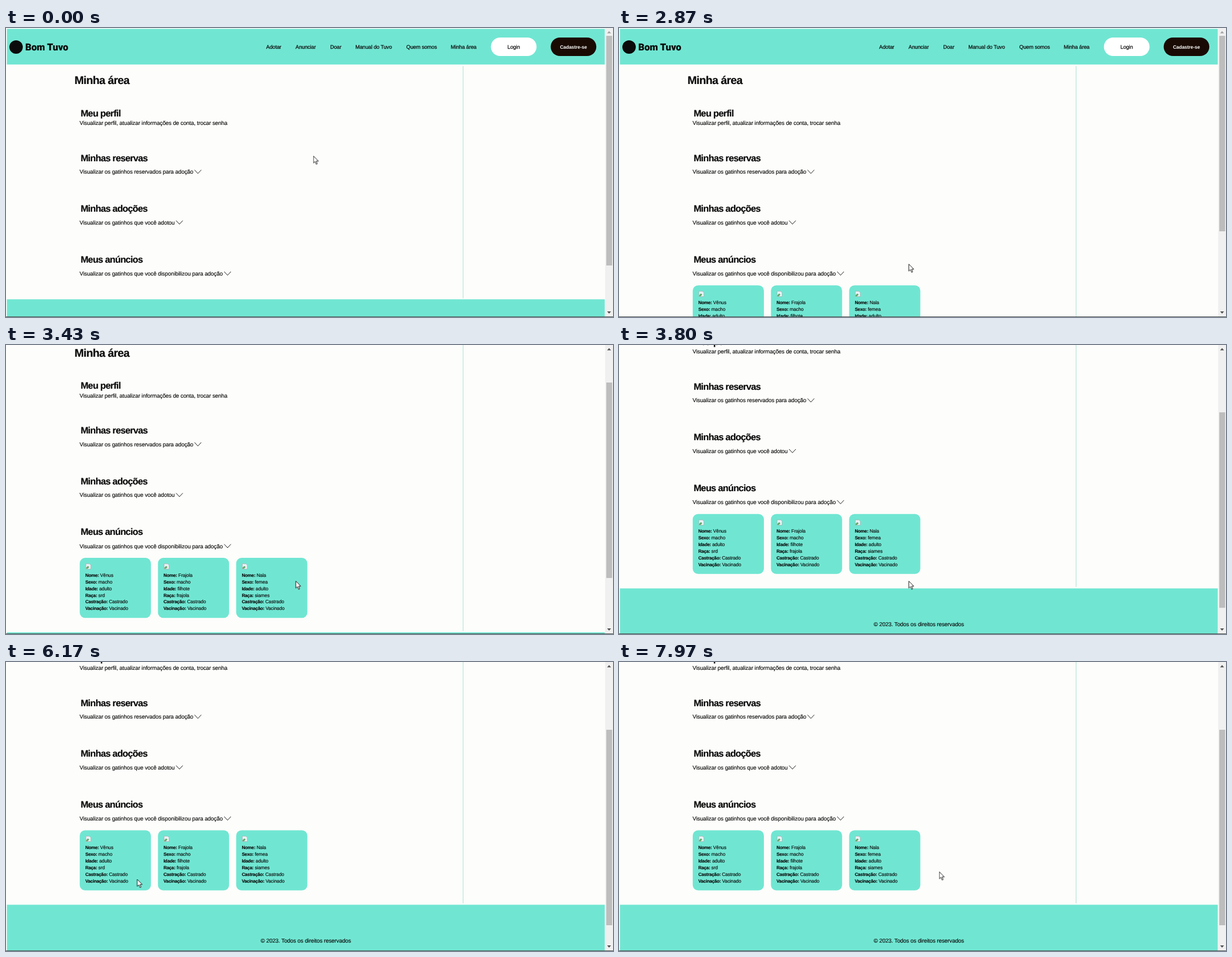
An HTML page that plays this animation: 1085 px wide and 516 px high, repeating every 8000 ms.

```html
<!DOCTYPE html>
<html lang="pt-BR">
<head>
<meta charset="utf-8">
<title>Minha área</title>
<style>
  html, body { margin: 0; width: 100%; height: 100%; overflow: hidden; background: #fdfdfb; }
  svg { display: block; width: 1085px; height: 516px; }
  text {
    font-family: "Liberation Sans", Arial, sans-serif; font-size: 10px; letter-spacing: -.1px;
    fill: #0b0b0b; stroke: #0b0b0b; stroke-width: .15px; white-space: pre;
    text-rendering: geometricPrecision;
  }
  .nav text { font-size: 9.4px; stroke-width: .25px; }
  .nav .join { font-size: 8.6px; font-weight: 700; fill: #fff; stroke: none; }
  .brand { font: 900 17px Roboto, sans-serif; letter-spacing: 0; }
  .title { font-size: 20px; font-weight: 700; letter-spacing: -.65px; stroke-width: .2px; }
  .head { font-size: 16.6px; font-weight: 700; letter-spacing: -.7px; stroke-width: .2px; }
  .card text { font-size: 8.5px; }
  .card .label { font-size: 8.2px; font-weight: 700; letter-spacing: -.25px; }
  .teal { fill: #70e6d2; }
  .chevron { fill: none; stroke: #1a1a1a; stroke-width: 1; }

  .page, .thumb, .footer, .open, .closed, .atTop, .cursor, .arrow, .hand {
    animation: 8s linear infinite;
  }
  .page { animation-name: scroll; }
  .thumb { animation-name: thumb; }
  .footer { animation-name: push; animation-timing-function: step-end; }
  .open { animation-name: show; animation-timing-function: step-end; }
  .closed { animation-name: hide; animation-timing-function: step-end; }
  .atTop { animation-name: enable; animation-timing-function: step-end; }
  .cursor { animation-name: move; animation-timing-function: ease-in-out; }
  .arrow { animation-name: arrow; animation-timing-function: step-end; }
  .hand { animation-name: hand; animation-timing-function: step-end; }

  @keyframes scroll {
    0%, 38.5% { transform: translateY(0); animation-timing-function: ease-in-out; }
    41%, 45% { transform: translateY(-79.4px); animation-timing-function: ease-in-out; }
    47.75%, 100% { transform: translateY(-159px); }
  }
  @keyframes thumb {
    0%, 38.5% { transform: translateY(0); animation-timing-function: ease-in-out; }
    41%, 45% { transform: translateY(53px); animation-timing-function: ease-in-out; }
    47.75%, 100% { transform: translateY(107px); }
  }
  @keyframes push { 0% { transform: translateY(0); } 22%, 100% { transform: translateY(108px); } }
  @keyframes show { 0% { visibility: hidden; } 22%, 100% { visibility: visible; } }
  @keyframes hide { 0% { visibility: visible; } 22%, 100% { visibility: hidden; } }
  @keyframes enable { 0% { fill: #a2a2a2; } 38.5%, 100% { fill: #505050; } }
  @keyframes move {
    0%, 4% { transform: translate(549.5px, 228.5px); }
    16%, 23% { transform: translate(399.5px, 434.5px); }
    30%, 55% { transform: translate(518px, 421.5px); }
    74%, 79% { transform: translate(234.5px, 388px); }
    97%, 100% { transform: translate(572.5px, 374.5px); }
  }
  @keyframes arrow { 0% { visibility: visible; } 15.5% { visibility: hidden; } 23.6%, 100% { visibility: visible; } }
  @keyframes hand { 0% { visibility: hidden; } 15.5% { visibility: visible; } 23.6%, 100% { visibility: hidden; } }
</style>
</head>
<body>
<svg viewBox="0 0 1085 516">
  <rect width="1085" height="516" fill="#fdfdfb"/>

  <g class="page">
    <rect class="teal" x="1.6" y="1.5" width="1068.7" height="63.7"/>
    <circle cx="18" cy="34" r="12" fill="#0b0b0b"/>
    <text class="brand" x="34.5" y="40">Bom Tuvo</text>
    <g class="nav">
      <rect x="866.7" y="17" width="81.7" height="33" rx="16.5" fill="#fff"/>
      <rect x="973.6" y="17" width="81.6" height="33" rx="16.5" fill="#190b03"/>
      <text x="465" y="36.8">Adotar</text>
      <text x="517.5" y="36.8">Anunciar</text>
      <text x="579.5" y="36.8">Doar</text>
      <text x="624.5" y="36.8">Manual do Tuvo</text>
      <text x="715.5" y="36.8">Quem somos</text>
      <text x="795" y="36.8">Minha área</text>
      <text x="907.5" y="36.8" text-anchor="middle">Login</text>
      <text class="join" x="1014.3" y="36.8" text-anchor="middle">Cadastre-se</text>
    </g>

    <rect x="816.3" y="68" width="1.6" height="522" fill="#c6eae2"/>
    <text class="title" x="122.5" y="100.3">Minha área</text>
    <g id="sections"></g>
    <g id="cards" class="open"></g>

    <g class="footer">
      <rect y="482.5" width="1071" height="3" fill="#fdfdfb"/>
      <rect class="teal" x="1.6" y="484.4" width="1068.7" height="240"/>
      <text x="536" y="551.8" text-anchor="middle">© 2023. Todos os direitos reservados</text>
    </g>
  </g>

  <rect x="1071" width="14" height="516" fill="#f0f0f0"/>
  <g class="thumb" fill="#bdbdbd">
    <rect class="closed" x="1073" y="14" width="10.5" height="410"/>
    <rect class="open" x="1073" y="14" width="10.5" height="349"/>
  </g>
  <path class="atTop" d="M1074.5 9.5h7l-3.5-4z"/>
  <path d="M1074.5 506h7l-3.5 4z" fill="#505050"/>
  <rect y="515" width="1085" height="1" fill="#4c5552"/>

  <g class="cursor" fill="#fff" stroke="#111" stroke-linejoin="round">
    <path class="arrow" d="M0 0V12.6L2.9 9.9 5 14.8 7 13.9 5 9.2H9Z"/>
    <path class="hand" d="M-1.5 10.5V1.2Q-1.5 0 0 0T1.5 1.2V6.2Q3 5 4 6.6 5.6 5.6 6.3 7.3 7.5 6.8 7.5 8.8V13L5.5 18.5H-1L-6 11.6Q-5.8 9.2-3.8 10L-1.5 12Z"/>
  </g>
</svg>

<script>
  const NS = "http://www.w3.org/2000/svg";
  const $ = id => document.getElementById(id);

  function add(parent, tag, attrs, content = "") {
    const el = document.createElementNS(NS, tag);
    for (const key in attrs) el.setAttribute(key, attrs[key]);
    el.textContent = content;
    return parent.appendChild(el);
  }

  // heading, baseline, description, its baseline, chevron x
  const sections = [
    ["Meu perfil", 157.5, "Visualizar perfil, atualizar informações de conta, trocar senha", 173],
    ["Minhas reservas", 237.5, "Visualizar os gatinhos reservados para adoção", 260.3, 337],
    ["Minhas adoções", 328.2, "Visualizar os gatinhos que você adotou", 350.8, 304],
    ["Meus anúncios", 418.7, "Visualizar os gatinhos que você disponibilizou para adoção", 442, 390]
  ];
  for (const [head, headY, note, noteY, x] of sections) {
    add($("sections"), "text", { class: "head", x: 133.5, y: headY }, head);
    add($("sections"), "text", { x: 131.5, y: noteY }, note);
    if (x) add($("sections"), "path", { class: "chevron", d: `M${x} ${noteY - 7}l6 6.5 6-6.5` });
  }

  const labels = ["Nome", "Sexo", "Idade", "Raça", "Castração", "Vacinação"];
  const cats = [
    ["Vênus", "macho", "adulto", "srd"],
    ["Frajola", "macho", "filhote", "frajola"],
    ["Nala", "femea", "adulto", "siames"]
  ];
  cats.forEach((cat, i) => {
    const card = add($("cards"), "g", { class: "card", transform: `translate(${131.8 + i * 139.8} 459.5)` });
    add(card, "rect", { class: "teal", width: 127.2, height: 107.2, rx: 9.5 });
    // missing-picture icon
    add(card, "path", { d: "M11 10.5h6.5l2.5 2.5v7h-9z", fill: "#e8f1f5", stroke: "#a3aeb0", "stroke-width": .8 });
    add(card, "path", { d: "M11.5 19.5v-2l3-3 2.5 2-3 3z", fill: "#62a968" });
    [...cat, "Castrado", "Vacinado"].forEach((value, row) => {
      const line = add(card, "text", { x: 10, y: 33.6 + row * 11.95 });
      add(line, "tspan", { class: "label" }, labels[row] + ":");
      add(line, "tspan", {}, " " + value);
    });
  });
</script>
</body>
</html>
```
